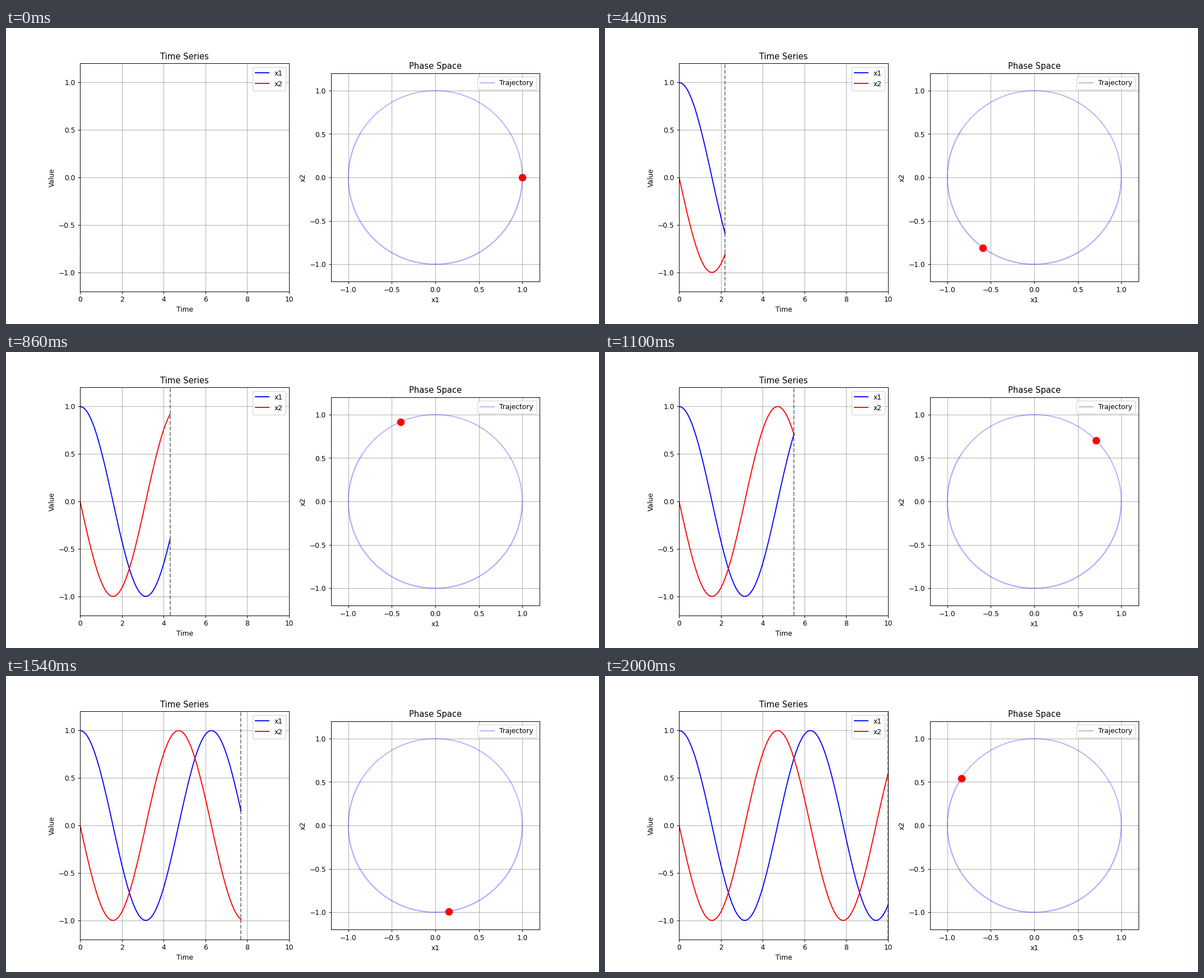
A matplotlib script that plays this animation: 1058 px wide and 529 px high, repeating every 2.04 s.

```python
import numpy as np
import matplotlib.pyplot as plt
from matplotlib.animation import FuncAnimation

STEPS = 100
HOLD = 1          # extra frames on the last state
INTERVAL = 20     # ms

# Harmonic oscillator x1' = x2, x2' = -x1, starting at (1, 0)
t = np.linspace(0, 10, STEPS + 1)
x1, x2 = np.cos(t), -np.sin(t)

plt.rcParams["font.family"] = "DejaVu Sans"
fig, (ax_time, ax_phase) = plt.subplots(1, 2, figsize=(12, 6), dpi=88.17)


def style(ax, title, xlabel, ylabel, xlim):
    ax.set(title=title, xlabel=xlabel, ylabel=ylabel, xlim=xlim, ylim=(-1.2, 1.2))
    ax.grid(True)
    ax.legend(loc="best")


line1, = ax_time.plot([], [], "b-", label="x1")
line2, = ax_time.plot([], [], "r-", label="x2")
cursor = ax_time.axvline(0, color="k", linestyle="--", alpha=0.5)
style(ax_time, "Time Series", "Time", "Value", (0, 10))

ax_phase.plot(x1, x2, "b-", alpha=0.3, label="Trajectory")
dot, = ax_phase.plot([], [], "ro", markersize=10)
style(ax_phase, "Phase Space", "x1", "x2", (-1.2, 1.2))
ax_phase.set_aspect("equal")


def update(frame):
    i = min(frame, STEPS)
    line1.set_data(t[:i + 1], x1[:i + 1])
    line2.set_data(t[:i + 1], x2[:i + 1])
    cursor.set_xdata([t[i], t[i]])
    dot.set_data([x1[i]], [x2[i]])
    return line1, line2, cursor, dot


def reset():
    return update(0)


anim = FuncAnimation(fig, update, frames=STEPS + 1 + HOLD, init_func=reset,
                     interval=INTERVAL, repeat=True, repeat_delay=0, blit=False)
plt.show()
```
